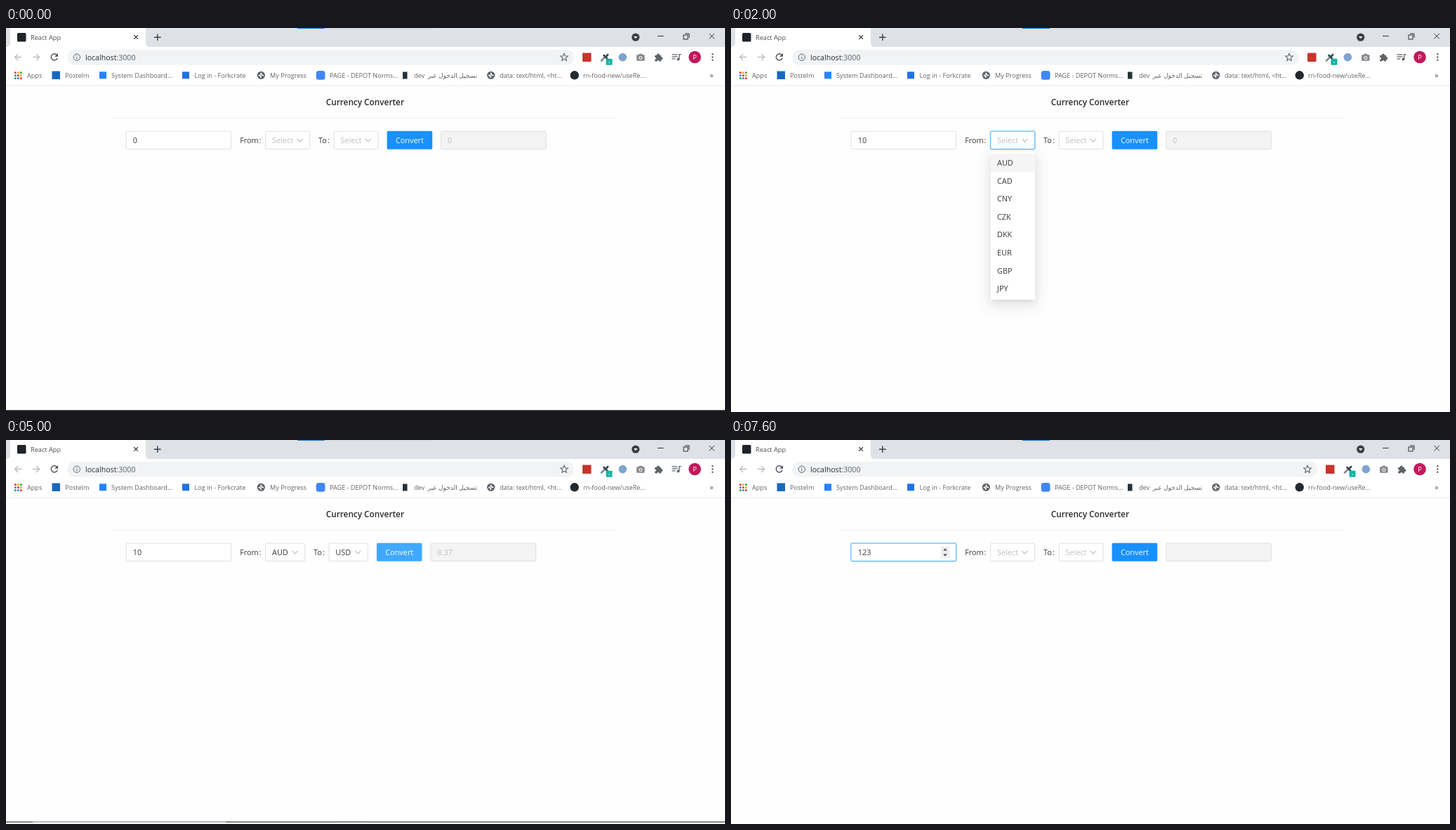
Animation, 1024 px wide and 547 px high, one loop 8 s. Source, as an HTML page:

```html
<!DOCTYPE html>
<html lang="en">
<head>
<meta charset="utf-8">
<title>Currency Converter</title>
<style>
html, body { margin: 0; width: 100%; height: 100%; overflow: hidden; background: #fefefe; }
svg { display: block; width: 100%; height: 100%; }
text { font-family: "Open Sans", "Noto Sans", "DejaVu Sans", sans-serif; white-space: pre; }
</style>
</head>
<body>
<svg id="stage" viewBox="0 0 1024 547" preserveAspectRatio="none"></svg>
<script>
const stage = document.getElementById('stage');
const LOOP = 8000;
const INK = '#3a3a3a', GREY = '#5f6368', MUTED = '#bfbfbf', BLUE = '#1890ff', GLOW = '#40a9ff';
const CODES = ['AUD', 'CAD', 'CNY', 'CZK', 'DKK', 'EUR', 'GBP', 'JPY'];

const rect = (x, y, w, h, fill, extra = '') =>
  `<rect x="${x}" y="${y}" width="${w}" height="${h}" fill="${fill}" ${extra}/>`;
const dot = (x, y, r, fill, extra = '') =>
  `<circle cx="${x}" cy="${y}" r="${r}" fill="${fill}" ${extra}/>`;
const fill = (d, color) => `<path d="${d}" fill="${color}"/>`;
const line = (d, color, w = 1, extra = '') =>
  `<path d="${d}" fill="none" stroke="${color}" stroke-width="${w}" ${extra}/>`;
const text = (x, y, s, size, color, extra = '') =>
  `<text x="${x}" y="${y}" font-size="${size}" fill="${color}" ${extra}>${s}</text>`;
const move = (x, y, body) => `<g transform="translate(${x} ${y})">${body}</g>`;
const cross = (x, y, r, color, w) =>
  line(`M ${x - r} ${y - r} l ${2 * r} ${2 * r} m 0 ${-2 * r} l ${-2 * r} ${2 * r}`, color, w);
// Small triangle, pointing down when h > 0
const wedge = (x, y, w, h, color) => fill(`M ${x - w / 2} ${y} h ${w} l ${-w / 2} ${h} z`, color);

// Browser frame

function tabStrip() {
  return rect(-10, -5, 1050, 32, '#dee1e6') +
    rect(415, -1, 39, 2, '#1877d2') + rect(454, -1, 154, 1.6, '#d3d6da') +
    rect(6, -8, 193, 34, '#fff', 'rx="6"') + rect(6, 16, 193, 11, '#fff') +
    fill('M 0 27 q 6 0 6 -6 v 6 z M 205 27 q -6 0 -6 -6 v 6 z', '#fff') +
    rect(16, 7, 12.5, 12.5, '#20232a', 'rx="1.5"') +
    text(35, 16.6, 'React App', 9.2, '#4a4d51') +
    cross(185.1, 13.1, 2.8, '#3c4043', 1.3) +
    line('M 211 13.3 h 9.6 M 215.8 8.5 v 9.6', '#3c4043', 1.4) +
    dot(896.7, 13.2, 5.6, '#3c4043') + wedge(896.7, 12, 5.6, 3.2, '#fff') +
    line('M 928 11.5 h 8.6', '#333') +
    rect(965, 10, 6, 6, 'none', 'stroke="#333"') + line('M 967 8 h 6 v 6', '#333') +
    cross(1005.2, 11.7, 3.7, '#333', 1);
}

function star() {
  const points = Array.from({ length: 10 }, (_, i) => {
    const a = Math.PI * (i / 5 - 0.5), r = i % 2 ? 2.5 : 5.6;
    return `${r * Math.cos(a)},${r * Math.sin(a)}`;
  });
  return `<polygon points="${points.join(' ')}" fill="none" stroke="${GREY}" stroke-width="1.1"/>`;
}

const dropper =
  line('M -5 5 l 6 -6', '#7b8f94', 2.6, 'stroke-linecap="round"') +
  line('M -1.5 -2.5 l 4.5 4.5 M 1 0 l 3 -3.4', '#3e4a50', 2.8, 'stroke-linecap="round"') +
  rect(1.5, 2.2, 9, 9, '#12b5a2', 'rx="1"') + rect(5.4, 7, 1.3, 1.3, '#fff');

const camera =
  rect(-5.7, -3.8, 11.4, 8.6, '#85888c', 'rx="1"') + rect(-2.6, -5.2, 5.2, 3, '#85888c', 'rx="1"') +
  dot(0, 0.4, 2.5, '#fff') + dot(0, 0.4, 1.5, '#85888c');

const puzzle =
  rect(-5.2, -3.2, 9, 8.8, GREY, 'rx="1"') + dot(-0.5, -3.6, 2, GREY) + dot(4, 1.2, 2, GREY) +
  dot(-5, 1.2, 1.5, '#fff') + dot(-0.5, 5.5, 1.5, '#fff');

const playlist =
  line('M -6.5 -3.7 h 8 M -6.5 -0.7 h 8 M -6.5 2.3 h 4.8', GREY, 1.3) +
  line('M 3.8 3 v -6.8 h 2.8', GREY, 1.3) + dot(2.4, 3, 1.9, GREY);

const globe = dot(0, 0, 5.6, GREY) +
  line('M -3.6 0.3 h 2.4 l 1.2 3.2 M 0.4 -3.6 l -0.6 2 l 2 1.8 h 2', '#fff', 1.7);

function toolbar(narrow) {
  const dx = narrow ? 26 : 0;
  const arrow = line('M 5 0 h -9.5 M -0.1 -4.5 l -4.5 4.5 l 4.5 4.5', '#b9bbbe', 1.3);
  const tools = move(795, 41.8, star()) + rect(821, 35.5, 12.5, 12.5, '#c9342c', 'rx="1"') +
    move(853, 41.5, dropper) + dot(878.3, 41.6, 5.8, '#7fa3cc') +
    move(903.8, 42, camera) + move(929.3, 42, puzzle);
  return rect(-10, 27, 1050, 55, '#fff') +
    move(17.3, 41.5, arrow) + `<g transform="translate(43 41.5) scale(-1 1)">${arrow}</g>` +
    line('M 72.4 38.4 A 4.6 4.6 0 1 0 73.2 43', '#4c5054', 1.4) +
    fill('M 74 36 v 4.8 h -4.8 z', '#4c5054') +
    rect(87, 31, 722 + dx, 21.6, '#f1f3f4', 'rx="10.8"') +
    dot(100.8, 41.7, 4.7, 'none', `stroke="${GREY}"`) +
    line('M 100.8 41.2 v 3 M 100.8 38.9 v 1.2', GREY, 1.1) +
    text(113, 45.5, `localhost<tspan fill="${GREY}">:3000</tspan>`, 10.6, '#2b2d30') +
    move(dx, 0, tools) + (narrow ? '' : move(955, 41.5, playlist)) +
    dot(981, 41.5, 8.8, '#c2185b') + text(981, 44.9, 'P', 9.3, '#fff', 'text-anchor="middle"') +
    [-4.3, 0, 4.3].map(dy => dot(1006.2, 41.5 + dy, 1.2, GREY)).join('');
}

function appGrid() {
  const hues = ['#e94335', '#f4a52a', '#34a853', '#4285f4'];
  let out = '';
  for (let i = 0; i < 9; i++)
    out += rect(12 + i % 3 * 4, 62.3 + Math.floor(i / 3) * 4, 2.7, 2.7, hues[i % 4]);
  return out;
}

function bookmarks() {
  const labels = [
    [30, 'Apps'], [84, 'Postelm'], [150, 'System Dashboard...'], [268.5, 'Log in - Forkcrate'],
    [376, 'My Progress'], [461, 'PAGE - DEPOT Norms...'], [581, 'dev'],
    [703, 'data: text/html, &lt;ht...'], [822, 'rn-food-new/useRe...']
  ];
  return appGrid() + rect(65.5, 61.5, 11.5, 11.5, '#1769be') +
    rect(133, 62.3, 10, 10, '#2684ff') + rect(251, 62.3, 10, 10, '#2272e4') +
    move(363.3, 67.3, globe) + rect(441.7, 61, 12.8, 12.8, '#4087f5', 'rx="3.5"') +
    rect(565, 62.5, 6.5, 10, '#263238') + move(690.7, 67.3, globe) + dot(809.7, 67.3, 6.2, '#24292e') +
    labels.map(([x, s]) => text(x, 70.6, s, 9.1, GREY)).join('') +
    text(671, 70.6, 'تسجيل الدخول عبر', 9, GREY, 'direction="rtl"') +
    text(1002.3, 70.6, '»', 10.5, '#4c5054') +
    rect(-10, 81.6, 1050, 0.9, '#e3e5e7');
}

// Converter form

const formText = (x, s, color = INK, extra = '') => text(x, 164.1, s, 10.9, color, extra);

function box(x, w, focus, bg = '#fff') {
  const halo = focus ? rect(x - 1.2, 145.9, w + 2.4, 27.8, '#d1e9ff', 'rx="2.4"') : '';
  return halo + rect(x, 147.1, w, 25.4, bg, `rx="1.6" stroke="${focus ? GLOW : '#dcdcdc'}" stroke-width="0.9"`);
}

const spinner = rect(299, 151.6, 12, 16.6, '#efefef') +
  wedge(305, 157.6, 5.6, -3.2, '#444') + wedge(305, 162.4, 5.6, 3.2, '#444');

function select(x, w, value, open) {
  return box(x, w, open) + formText(x + 9.3, value || 'Select', value ? INK : MUTED) +
    line(`M ${x + w - 18.2} 157.9 l 4 4.3 l 4 -4.3`, '#bdbdbd', 1.1);
}

function menu(x) {
  const shade = (dy, grow, blur, a) =>
    rect(x - grow, 176 + dy - grow, 63.5 + 2 * grow, 211 + 2 * grow, '#000', `opacity="${a}" style="filter: blur(${blur}px)"`);
  return shade(7.2, 6.4, 11.2, 0.05) + shade(4.8, 0, 6.4, 0.08) + shade(2.4, -3.2, 2.4, 0.12) +
    rect(x, 176, 63.5, 211, '#fff', 'rx="1.6"') + rect(x, 179.2, 63.5, 25.6, '#f5f5f5') +
    CODES.map((c, i) => text(x + 9.3, 196 + i * 25.6, c, 10.9, INK)).join('');
}

function form(s) {
  const fromX = 369.7, fromW = s.from ? 56 : 63;
  const labelX = fromX + fromW + 12.3, toX = labelX + 22, toW = s.to ? 55.3 : 63;
  const btnX = toX + toW + 12.6, outX = btnX + 64.6 + 12.5;
  return text(455.7, 109.6, 'Currency Converter', 11.8, '#2b2b2b', 'font-weight="600"') +
    rect(152, 128, 720, 0.9, '#f0f0f0') +
    box(171, 149.6, s.typing) + formText(180.8, s.amount) + (s.typing ? spinner : '') +
    formText(333.2, 'From') + formText(360.4, ':') + select(fromX, fromW, s.from, s.open === 'from') +
    formText(labelX, 'To') + formText(labelX + 12.9, ':') + select(toX, toW, s.to, s.open === 'to') +
    rect(btnX, 146.7, 64.6, 26, s.hover ? GLOW : BLUE, 'rx="1.6"') +
    formText(btnX + 32.3, 'Convert', '#fff', 'text-anchor="middle"') +
    box(outX, 149.6, false, '#f4f4f4') + formText(outX + 9.4, s.result, MUTED) +
    (s.marked ? line(`M ${outX + 10} 170.9 h 17.6`, '#e0141e', 3, 'stroke-linecap="round"') : '') +
    (s.open ? menu(s.open === 'from' ? fromX : toX) : '');
}

function bottomEdge(kind) {
  if (kind === 'bar') return rect(0, 544.3, 1024, 3, '#1b1b1b');
  if (!kind) return '';
  const [dark, mid] = kind === 'dark' ? ['#555', '#8a8a8a'] : ['#8c8c8c', '#b0b0b0'];
  return rect(0, 543.4, 1024, 1.4, dark) + rect(38, 543.4, 275, 1.4, '#cfcfcf') + rect(473, 543.4, 38, 1.4, mid);
}

// Each scene keeps the fields of the one before it unless it changes them.
const scenes = [
  { at: 0, amount: '0', result: '0', edge: 'bar' },
  { at: 1000, amount: '10', typing: true, zoom: true, edge: '' },
  { at: 2000, typing: false, zoom: false, open: 'from' },
  { at: 3000, from: 'AUD', open: 'to' },
  { at: 4000, to: 'USD', open: '', edge: 'light' },
  { at: 5000, hover: true, result: '8.37', edge: 'dark' },
  { at: 6000, marked: true },
  { at: 7600, amount: '123', typing: true, from: '', to: '', hover: false, marked: false, result: '', edge: '', narrow: true }
];
scenes.forEach((s, i) => { scenes[i] = { ...scenes[i - 1], ...s }; });

function draw(s) {
  const view = s.zoom ? 'translate(-5.4 0) scale(1.0055)' : 'translate(0 0)';
  stage.innerHTML = rect(0, 0, 1024, 547, '#fefefe') +
    `<g transform="${view}">${tabStrip()}${toolbar(s.narrow)}${bookmarks()}${form(s)}${bottomEdge(s.edge)}</g>`;
}

let shown;
const start = performance.now();
function tick() {
  const t = (performance.now() - start) % LOOP;
  const scene = scenes.filter(s => s.at <= t).pop();
  if (scene !== shown) draw(shown = scene);
  requestAnimationFrame(tick);
}
tick();
</script>
</body>
</html>
```
